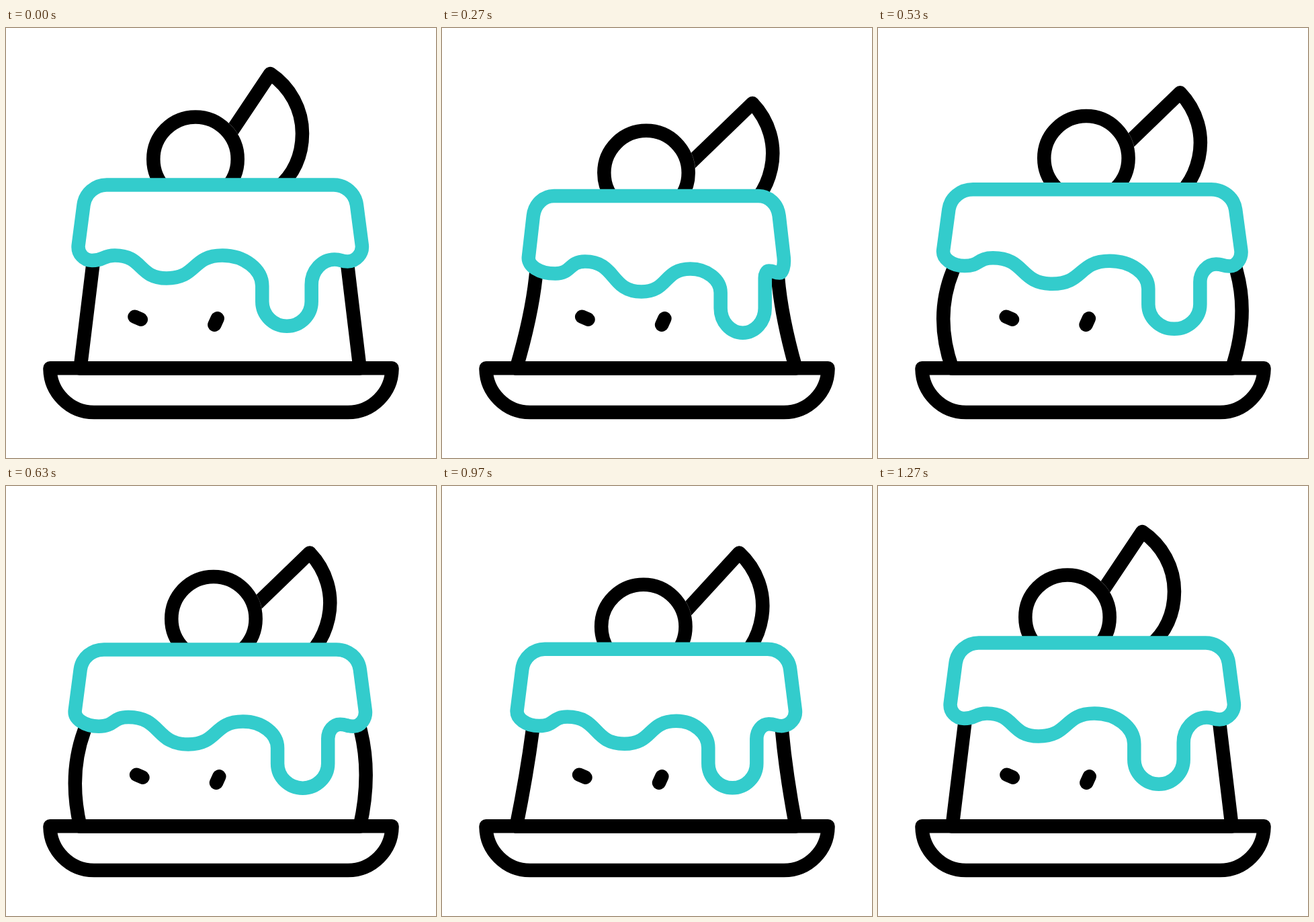
An HTML page that plays this animation: 640 by 640 pixels, repeating every 1.67 s.

```html
<!DOCTYPE html>
<html lang="en">
<head>
<meta charset="utf-8">
<title>Pudding</title>
<style>
  html, body { margin: 0; width: 100%; height: 100%; overflow: hidden; background: #fff; }
  svg { display: block; width: 100%; height: 100%; }
  path, circle { fill: none; stroke: #000; stroke-width: 20.5; stroke-linejoin: round; }
  #cherry, #icing { fill: #fff; }
  #icing { stroke: #33cccc; }
  #seam { stroke: #fff; stroke-width: .8; stroke-opacity: .6; }
  #seeds { stroke-linecap: round; }
</style>
</head>
<body>
<svg viewBox="0 0 640 640">
  <path id="leaf" d="M-93 139L0 0C29.7 20 47.7 53 47.7 89C47.7 122 34.7 151 10.7 170"/>
  <g id="fruit">
    <circle id="seam" r="73"/>
    <circle id="cherry" r="62.7"/>
  </g>
  <path id="body"/>
  <path id="seeds" d="M191.5 429.7L200.8 433.7M314.7 432.3L310.4 441.7"/>
  <path id="icing"/>
  <path d="M65.5 506.3H574.5C574.5 542.5 545 572 509 572H131C95 572 65.5 542.5 65.5 506.3Z"/>
</svg>
<script>
const LOOP = 1670, STEP = 100 / 3, LAST = 38, MID = 318.75;
const $ = id => document.getElementById(id);
const move = (id, transform) => $(id).setAttribute('transform', transform);

// Squash, rebound, squash again, settle: eased from pose to pose
const wobble = (gap, end) => (n, rest, down, up, again) => {
  const beats = [0, 8, 8 + gap, 8 + 2 * gap, end];
  const poses = [rest, down, up, again, rest];
  const i = beats.findIndex(b => b > n) - 1;
  if (i < 0) return rest;
  const u = (n - beats[i]) / (beats[i + 1] - beats[i]);
  return poses[i] + (poses[i + 1] - poses[i]) * u * u * (3 - 2 * u);
};
const loose = wobble(8.5, LAST);   // cherry, seeds
const firm = wobble(8.5, 36.4);    // leaf, body
const thick = wobble(8, 35);       // icing

// Point and curve helpers
const mix = (a, b, u, v = u) => ({ x: a.x + (b.x - a.x) * u, y: a.y + (b.y - a.y) * v });
const at = p => `${p.x} ${p.y}`;
const line = p => 'L' + at(p);
const cubic = (...pts) => 'C' + pts.map(at).join(' ');
const wave = (a, b) => cubic(mix(a, b, .55, 0), mix(a, b, .45, 1), b);
const turnDown = (a, b) => cubic(mix(a, b, .55, 0), mix(a, b, 1, .45), b);
const turnUp = (a, b) => cubic(mix(a, b, 0, .55), mix(a, b, .45, 1), b);

function icingPath(n, sag) {
  const stretch = thick(n, 1, .9, 1.05, .967);
  const lag = thick(n, 0, 15, 5, 0);
  // Place at rest, drift at full sag, share of the drip's lag
  const pt = (x, y, dx, dy, pull = 0) => ({
    x: MID + (x + dx * sag + pull * lag - MID) * stretch,
    y: y + dy * sag
  });
  const side = dir => ({
    top: pt(MID + dir * 169, 233.5, 0, 16.5),
    corner: pt(MID + dir * 203.25, 263.5, 0, 16.2),
    lip: pt(MID + dir * 211, 323, 0, 18)
  });
  const L = side(-1), R = side(1);
  const low = pt(128, 346, 24, 19.5);
  const crest = pt(162, 338.5, 39, 9);
  const trough = pt(239, 372.5, 55.5, 20);
  const hump = pt(322, 338.5, 48, 20, .35);
  const knee = pt(489, 344.5, 1, 17, 1);
  const dip = pt(508.5, 347.5, 1, 17, .9);

  const r = 36.7;
  const drip = (dir, y, dy) => pt(418 + dir * r, y, 29, dy, 1);

  return 'M' + at(L.top) + line(R.top)
    + cubic(mix(R.top, R.corner, .5, 0), mix(R.lip, R.corner, 1.29), R.corner)
    + line(R.lip)
    + cubic(mix(R.corner, R.lip, 1.21), mix(dip, R.lip, .6, 0), dip)
    + wave(dip, knee)
    + turnDown(knee, drip(1, 382, -10)) + line(drip(1, 407, 10))
    + `A${r * stretch} ${r} 0 0 1 ` + at(drip(-1, 407, 10))
    + line(drip(-1, 384, 10)) + turnUp(drip(-1, 384, 10), hump)
    + wave(hump, trough) + wave(trough, crest) + wave(crest, low)
    + cubic(mix(low, L.lip, .6, 0), mix(L.corner, L.lip, 1.21), L.lip)
    + line(L.corner)
    + cubic(mix(L.lip, L.corner, 1.29), mix(L.top, L.corner, .5, 0), L.top) + 'Z';
}

function bodyPath(n, sag) {
  const wall = (foot, bend, top) => ({
    foot: { x: foot, y: 506.6 },
    bend: { x: bend, y: 430 },
    top: { x: top, y: 355 + 16 * sag }
  });
  const l = wall(110.5, firm(n, 120, 133, 83, 128.5), firm(n, 129, 139.5, 111, 137));
  const r = wall(526.7, firm(n, 517.5, 505, 553, 510), firm(n, 508.5, 500, 534, 505));
  // Both ends run on a little, under the icing
  const tuck = w => mix(w.bend, w.top, 1.15);
  return 'M' + at(tuck(l)) + line(l.top) + `Q${at(l.bend)} ${at(l.foot)}`
    + line(r.foot) + `Q${at(r.bend)} ${at(r.top)}` + line(tuck(r));
}

function draw(n) {
  const sag = thick(n, 0, 1, .415, 1);
  const leafX = firm(n, 393.3, 462, 449.5, 461.8);
  const leafY = firm(n, 68, 112, 96.2, 112);
  const turn = firm(n, 0, 12.2, 12.2, 12.2);
  const fruitX = loose(n, 282, 304, 310, 305);
  const fruitY = loose(n, 195.2, 215.5, 193.5, 213.5);
  move('leaf', `translate(${leafX} ${leafY}) rotate(${turn})`);
  move('fruit', `translate(${fruitX} ${fruitY})`);
  move('seeds', `translate(${loose(n, 0, 16.7, -1, 16.3)} 0)`);
  $('body').setAttribute('d', bodyPath(n, sag));
  $('icing').setAttribute('d', icingPath(n, sag));
}

const start = performance.now();
function tick() {
  const t = (performance.now() - start) % LOOP;
  draw(Math.min(LAST, Math.floor(t / STEP + .1)));
  requestAnimationFrame(tick);
}
tick();
</script>
</body>
</html>
```
